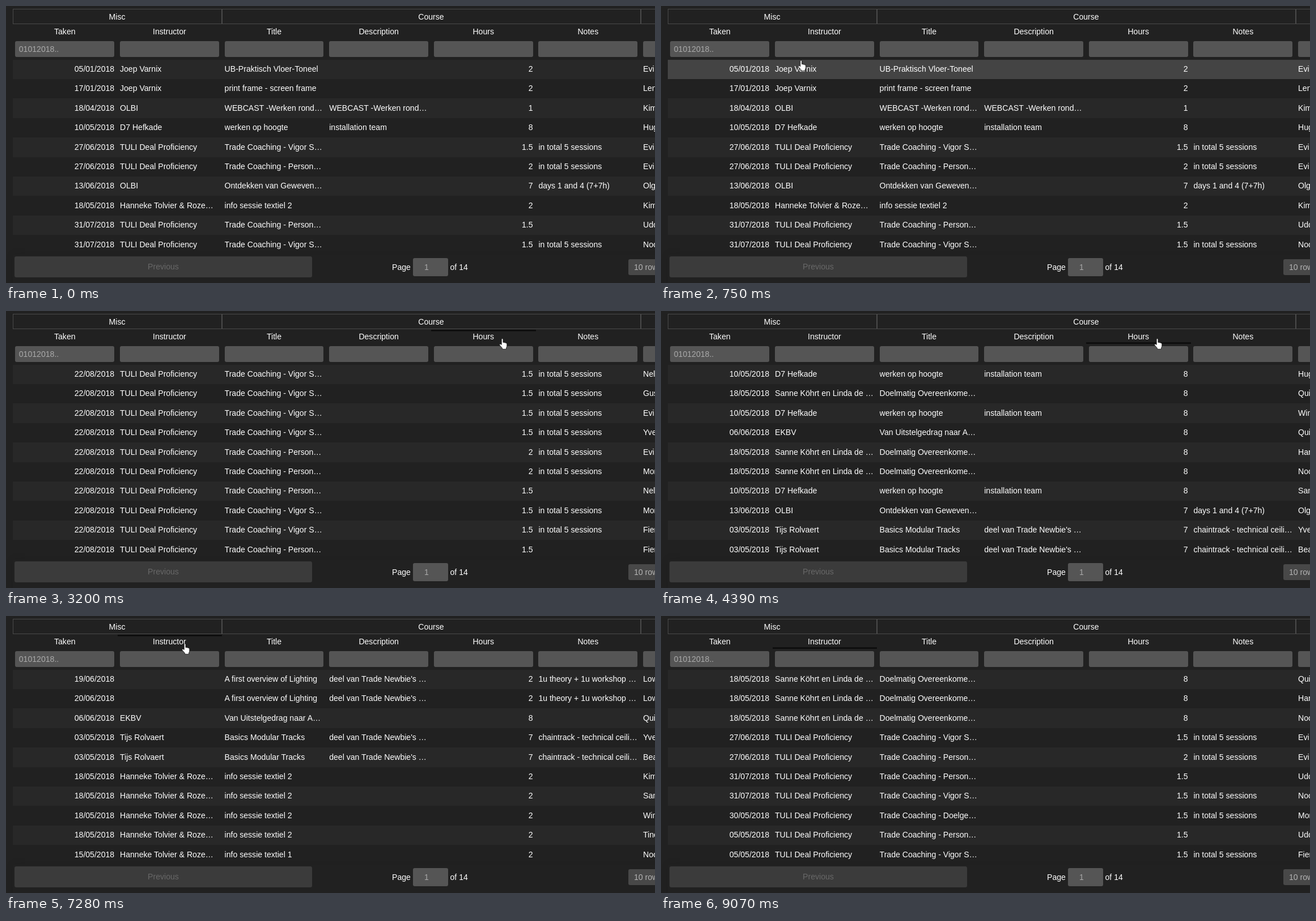
Write an HTML page that moves like this. It is 1145 px wide and 489 px high and loops after 9190 ms.

```html
<!DOCTYPE html>
<html lang="en">
<head>
<meta charset="utf-8">
<title>Course table</title>
<style>
  html, body { margin: 0; width: 100%; height: 100%; overflow: hidden; background: #212121; }
  #stage {
    position: relative; width: 1145px; height: 489px; overflow: hidden;
    font: 14.08px "Liberation Sans", Arial, sans-serif; color: #fff;
  }
  #stage div { position: absolute; box-sizing: border-box; white-space: pre; }
  .group { border: 1px solid #4a4a4a; text-align: center; text-indent: -1px; }
  .head { text-align: center; text-indent: -1px; }
  .field { background: #555; border-radius: 3px; color: #aaa; }
  .row { background: #212121; }
  .row.odd { background: #282828; }
  .row.hover { background: #444; }
  .cell { overflow: hidden; text-overflow: ellipsis; }
  .right { text-align: right; }
  .foot { box-shadow: 0 0 13px rgba(0, 0, 0, .1); }
  .prev { background: #3b3b3b; border-radius: 3px; color: #686868; text-align: center; }
  .select { background: #484848; border-radius: 3px; color: #b4b4b4; }
  #hand { position: absolute; left: 0; top: 0; overflow: visible; }
</style>
</head>
<body>
<div id="stage"></div>
<script>
const LOOP = 9190;
const LEFT = 12, COL = 184.6, PAD = 4.4, INNER = COL - 2 * PAD - 1, TOP = 94.6, ROW = 34.4;
const stage = document.getElementById('stage');

function box(cls, x, y, w, h, text = '', parent = stage) {
  const el = document.createElement('div');
  el.className = cls;
  el.textContent = text;
  el.style.cssText = `left:${x}px;top:${y}px;width:${w}px;height:${h}px;line-height:${h}px`;
  return parent.appendChild(el);
}

// instructor, title, description, hours, notes
const five = 'in total 5 sessions';
const trade = 'TULI Deal Proficiency';
const vigor = 'Trade Coaching - Vigor Sessions';
const personal = 'Trade Coaching - Personal plan';
const webcast = 'WEBCAST -Werken rond drukte op kantoor';
const duo = 'Hanneke Tolvier & Rozemarijn Beekx';
const part = "deel van Trade Newbie's pakket";
const courses = {
  a: ['Joep Varnix', 'UB-Praktisch Vloer-Toneel', '', 2, ''],
  p: ['Joep Varnix', 'print frame - screen frame', '', 2, ''],
  m: ['Joep Varnix', 'motoren', 'KLV 2000 / 4000, technische kant', 2, ''],
  w: ['OLBI', webcast, webcast, 1, ''],
  h: ['D7 Hefkade', 'werken op hoogte', 'installation team', 8, ''],
  v: [trade, vigor, '', 1.5, five],
  i: [trade, personal, '', 2, five],
  j: [trade, personal, '', 1.5, ''],
  d: [trade, 'Trade Coaching - Doelgericht bellen', '', 1.5, five],
  t: ['OLBI', 'Ontdekken van Geweven stoffen', '', 7, 'days 1 and 4 (7+7h)'],
  s: [duo, 'info sessie textiel 2', '', 2, ''],
  r: [duo, 'info sessie textiel 1', '', 2, ''],
  l: ['', 'A first overview of Lighting', part, 2, '1u theory + 1u workshop practice'],
  x: ['EKBV', 'Van Uitstelgedrag naar Actieplan', '', 8, ''],
  g: ['Tijs Rolvaert', 'Basics Modular Tracks', part, 7, 'chaintrack - technical ceilings'],
  n: ['Sanne Köhrt en Linda de Wolvaart', 'Doelmatig Overeenkomen in teams', '', 8, '']
};

// Each view: start time, then "day/month course student" rows
const views = [
  [0, '05/01 a Evi,17/01 p Lena,18/04 w Kim,10/05 h Hugo,27/06 v Evi,27/06 i Evi,13/06 t Olga,18/05 s Kim,31/07 j Udo,31/07 v Noor'],
  [1640, '05/01 a Evi,05/01 a Lena,05/01 a Saar,15/01 m Evi,15/01 m Lena,15/01 m Saar,17/01 p Lena,17/01 p Evi,17/01 p Zita,17/01 p Vic'],
  [2420, '22/08 v Nele,22/08 v Gus,22/08 v Evi,22/08 v Yves,22/08 i Evi,22/08 i Mona,22/08 j Nele,22/08 v Mona,22/08 v Fien,22/08 j Fien'],
  [3630, '18/04 w Kim,18/04 w Olga,18/04 w Noor,27/06 v Evi,31/07 j Udo,31/07 v Noor,30/05 d Mona,05/05 j Udo,05/05 v Fien,22/08 v Nele'],
  [4390, '10/05 h Hugo,18/05 n Quin,10/05 h Wim,06/06 x Quin,18/05 n Hanne,18/05 n Noor,10/05 h Sam,13/06 t Olga,03/05 g Yves,03/05 g Bea'],
  [5250, '05/01 a Evi,17/01 p Lena,27/06 v Evi,27/06 i Evi,13/06 t Olga,18/05 s Kim,31/07 j Udo,31/07 v Noor,30/05 d Mona,05/05 j Udo'],
  [6040, '18/04 w Kim,18/04 w Olga,18/04 w Noor,15/01 m Evi,15/01 m Lena,15/01 m Saar,10/05 h Hugo,10/05 h Wim,10/05 h Sam,19/06 l Lowie'],
  [7110, '19/06 l Lowie,20/06 l Lowie,06/06 x Quin,03/05 g Yves,03/05 g Bea,18/05 s Kim,18/05 s Sam,18/05 s Wim,18/05 s Tine,15/05 r Noor'],
  [8350, '18/05 n Quin,18/05 n Hanne,18/05 n Noor,27/06 v Evi,27/06 i Evi,31/07 j Udo,31/07 v Noor,30/05 d Mona,05/05 j Udo,05/05 v Fien']
].map(([time, list]) => ({
  time,
  rows: list.split(',').map(line => {
    const [day, course, student] = line.split(' ');
    return [day + '/2018', ...courses[course], student];
  })
}));

// Sort marker: end time, column, 1 = ascending (top), -1 = descending (bottom)
const sorts = [
  [1300, 0, 1], [2090, 0, -1], [3200, 4, 1], [3970, 4, -1],
  [4870, 3, 1], [5690, 3, -1], [6850, 1, 1], [8030, 1, -1]
];
const SLIDE = 90;

// Pointer: time, x, y
const path = [
  [20, 720, 472], [370, 570, 257], [470, 570, 257], [920, 89, 20], [1040, 95, 44],
  [1240, 95, 44], [1650, 137, 50], [2660, 137, 50], [3150, 870, 48], [4510, 870, 48],
  [4820, 658, 44], [6220, 658, 44], [6800, 316, 51], [7110, 316, 51], [7280, 310, 48],
  [7510, 306, 46], [7660, 306, 46], [7740, 304, 40], [8550, 304, 40], [9070, 420, 489]
];

// Static parts
box('group', 12, 5, 369, 27, 'Misc');
box('group', 381, 5, 739, 27, 'Course');
box('group', 1120, 5, 369, 27);
const heads = ['Taken', 'Instructor', 'Title', 'Description', 'Hours', 'Notes', ''].map((name, i) => {
  const x = LEFT + COL * i;
  const field = box('field', x + PAD, 62, INNER, 28);
  if (!i) box('', 6.4, 0, 120, 28, '01012018..', field);
  return box('head', x, 33, COL, 25, name);
});

const rows = Array.from({ length: 10 }, (_, r) => {
  const el = box('row' + (r % 2 ? '' : ' odd'), LEFT, TOP + ROW * r, 1300, ROW);
  const cells = heads.map((_, c) =>
    box('cell' + (c === 0 || c === 4 ? ' right' : ''), COL * c + PAD, -.7, INNER, ROW, '', el));
  return { el, cells };
});

box('foot', 12, 439, 1300, 60);
box('prev', 15, 442, 525, 37, 'Previous');
box('', 681, 445, 40, 32, 'Page');
box('', 20, 0, 20, 32, '1', box('field', 718, 445, 62, 32));
box('', 783.5, 445, 50, 32, 'of 14');
box('', 10, 0, 80, 28, '10 rows', box('select', 1098, 447, 90, 28));

stage.insertAdjacentHTML('beforeend', `
  <svg id="hand" width="16" height="20" viewBox="0 0 16 20">
    <path fill="#fff" stroke="#111" stroke-width=".8" stroke-linejoin="round"
      d="M4.2 11.5V2.2a1.4 1.4 0 0 1 2.8 0V7.6q1.3-.9 2.4.4q1.4-.7 2.3.6q1.9-.5 2.1 1.4V13.6
         q0 1.8-1.2 3.4V19.3H5.6V17.6L1.1 12.4q-.9-1.4.2-2.1q1-.5 1.9.5z"/>
  </svg>`);
const hand = document.getElementById('hand');

const clamp = v => Math.max(0, Math.min(1, v));
const mix = (a, b, k) => a + (b - a) * k;

function pointerAt(t) {
  const i = path.findIndex(p => p[0] > t);
  if (i < 1) return null;
  const [t0, x0, y0] = path[i - 1], [t1, x1, y1] = path[i];
  let k = (t - t0) / (t1 - t0);
  k = k * k * (3 - 2 * k);
  return [mix(x0, x1, k), mix(y0, y1, k)];
}

function markerAt(t, col) {
  let v = 0;
  for (const [end, c, dir] of sorts) {
    v = mix(v, c === col ? dir : 0, clamp((t - end + SLIDE) / SLIDE));
  }
  return v;
}

let shown = null;
function showView(t) {
  const view = views.filter(v => v.time <= t).pop();
  if (view === shown) return;
  shown = view;
  view.rows.forEach((data, r) =>
    data.forEach((text, c) => { rows[r].cells[c].textContent = text; }));
}

function draw() {
  const t = performance.now() % LOOP;
  showView(t);
  heads.forEach((el, c) => {
    const v = markerAt(t, c);
    el.style.boxShadow = v ? `inset 0 ${v * 2.64}px 0 0 rgba(0,0,0,.6)` : 'none';
  });
  const p = pointerAt(t);
  hand.style.display = p ? '' : 'none';
  if (p) hand.style.transform = `translate(${p[0]}px,${p[1]}px)`;
  const over = p ? Math.floor((p[1] + 1 - TOP) / ROW) : -1;
  rows.forEach(({ el }, r) => el.classList.toggle('hover', r === over));
  requestAnimationFrame(draw);
}
draw();
</script>
</body>
</html>
```
